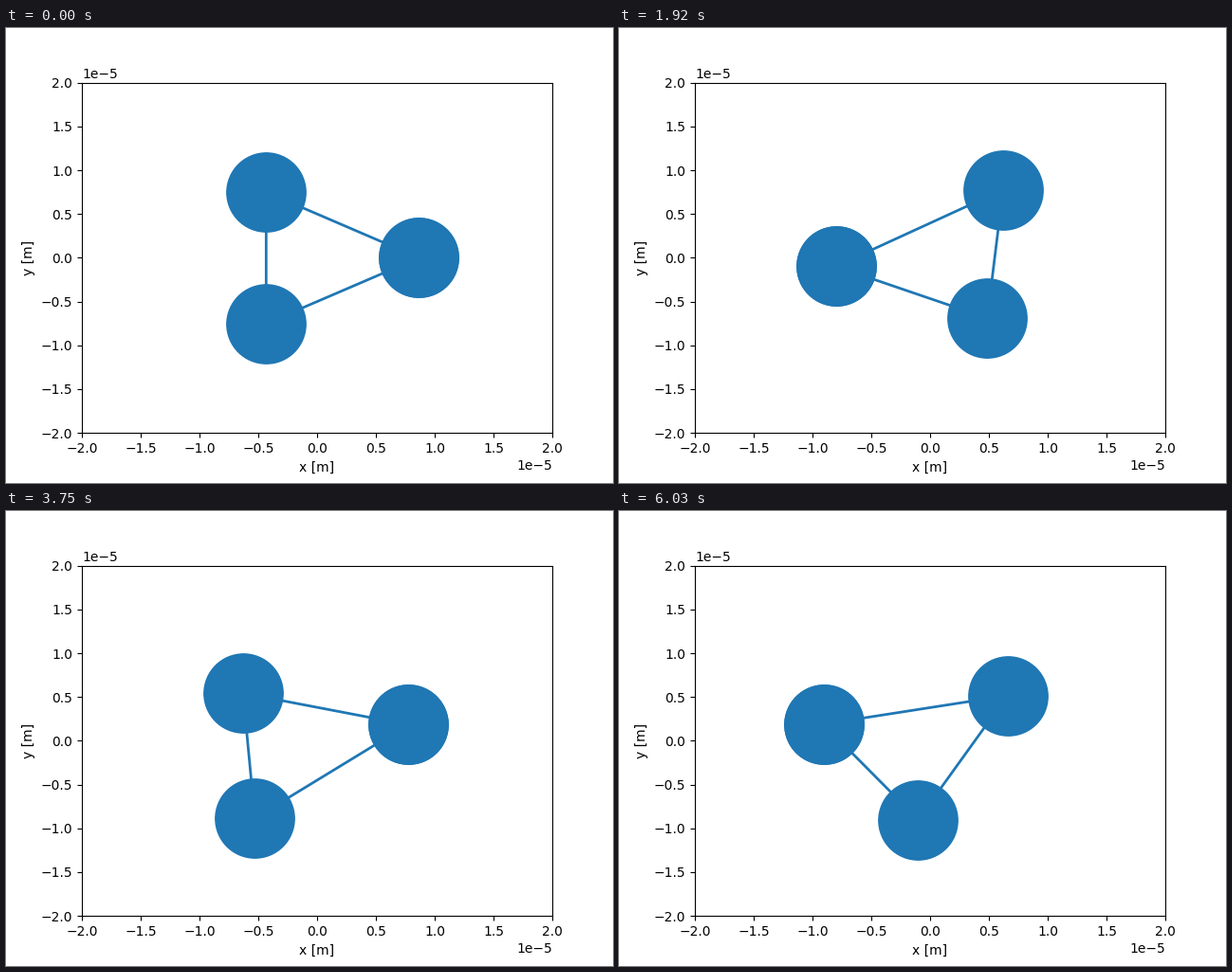
A matplotlib script for the animation above (6060 ms loop, 640x480 px).

```python
import numpy as np
import matplotlib.pyplot as plt
from matplotlib.animation import FuncAnimation

FRAMES = 202
INTERVAL = 30          # ms
UNIT = 1e-5            # m
SPIN = np.radians(-2.802)   # rotation per frame in the shear flow
RELAX = 0.4                 # decay rate of the starting transient
CORNERS = np.exp(2j * np.pi * np.arange(3) / 3)


def drift(n):
    """Steady path of the triangle's centre: slow drift plus a threefold wobble."""
    c, s = np.cos(3 * SPIN * n), np.sin(3 * SPIN * n)
    x = 0.103 - 0.00134 * n - 0.085 * c + 0.021 * s
    y = -0.0141 - 0.00002 * n - 0.0105 * c - 0.054 * s
    return x + 1j * y


def beads(n):
    """Bead positions as complex numbers, closed back to the first one."""
    fade = np.exp(-RELAX * n)
    psi = 3 * SPIN * n
    turn = SPIN * n - np.radians(0.1) * (1 - fade)
    radius = 0.8752 - (0.8752 - np.sqrt(0.75)) * fade

    # elongation along an axis that stays fixed while the beads rotate
    axis = np.radians(73.5 + 1.2 * np.cos(psi) + 2.5 * np.sin(psi))
    stretch = (0.1075 + 0.0035 * np.cos(psi)) * np.exp(1j * axis)
    stretch *= 1 - fade * np.exp(-0.1j * n)

    ring = CORNERS * np.exp(1j * turn)
    centre = drift(n) - drift(0) * fade
    z = centre + radius * (ring + stretch * ring.conj())
    return UNIT * np.append(z, z[0])


fig, ax = plt.subplots(figsize=(6.4, 4.8), dpi=100)
ax.set_xlim(-2 * UNIT, 2 * UNIT)
ax.set_ylim(-2 * UNIT, 2 * UNIT)
ax.set_xlabel("x [m]")
ax.set_ylabel("y [m]")
line, = ax.plot([], [], "o-", color="#1f77b4", lw=2, markersize=60)


def update(n):
    z = beads(n)
    line.set_data(z.real, z.imag)
    return line,


anim = FuncAnimation(fig, update, frames=FRAMES, interval=INTERVAL,
                     repeat=True, repeat_delay=0)
plt.show()
```
